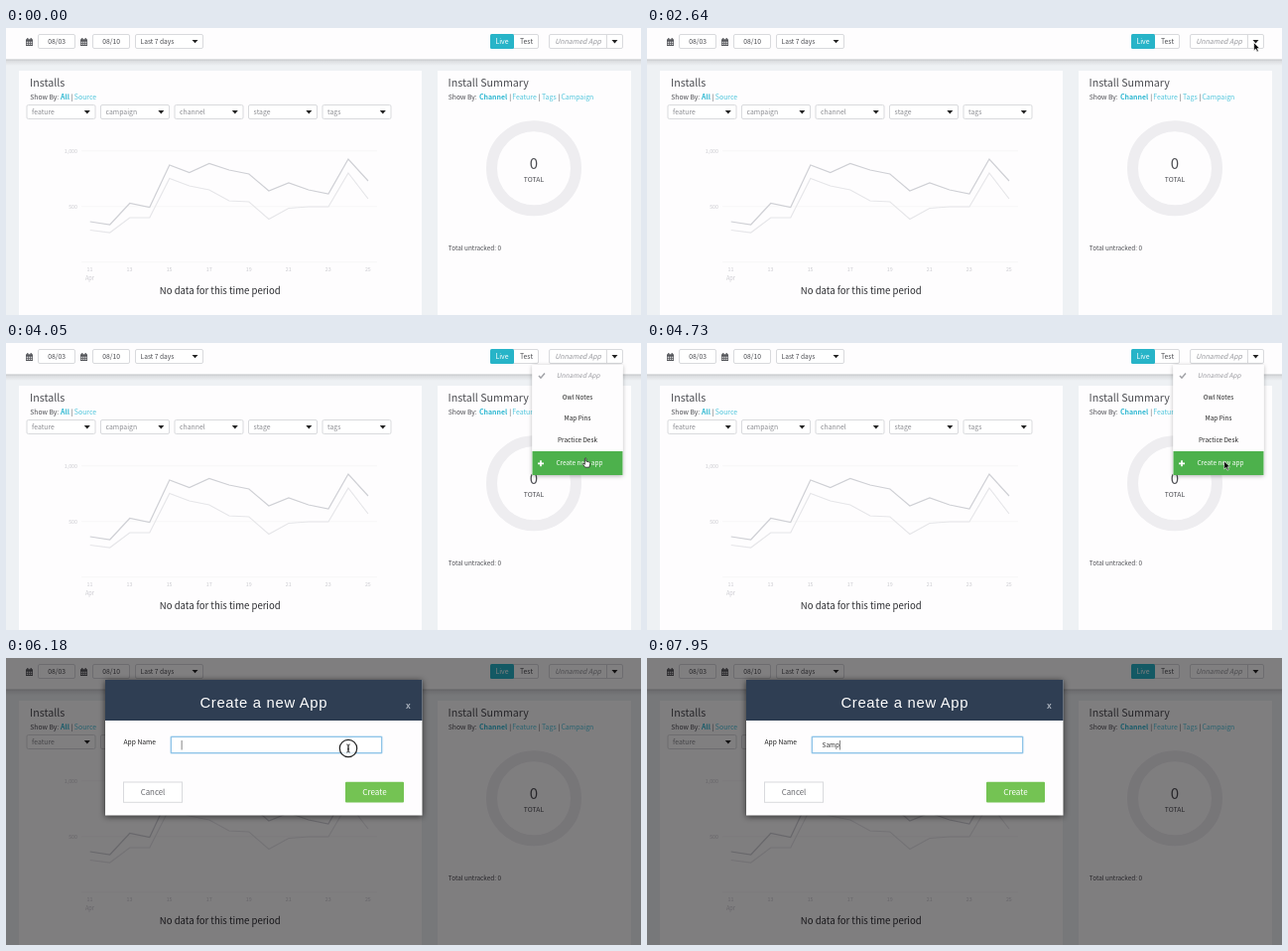
Recreate the animation shown at these times as an HTML page. Size 640x289 px, loop 8000 ms.

```html
<!DOCTYPE html>
<html lang="en">
<head>
<meta charset="utf-8">
<title>Create a new app</title>
<style>
  html, body { margin: 0; width: 100%; height: 100%; overflow: hidden; background: #eef1f4; }
  svg { display: block; width: 100vw; height: 100vh; font-family: "Noto Sans CJK SC", "Noto Sans CJK JP", "Noto Sans CJK", Lato, sans-serif; font-weight: 300; }
  text { white-space: pre; }
</style>
</head>
<body>
<svg id="stage" viewBox="0 0 640 289"></svg>
<script>
const LOOP = 8000;
const INK = '#4c4d52', GREY = '#8b8c91', LINK = '#4fc6dc', EDGE = '#d9dadd';

const text = (x, y, s, size, fill = INK, extra = '') =>
  `<text x="${x}" y="${y}" font-size="${size}" fill="${fill}" ${extra}>${s}</text>`;
const mid = (x, y, s, size, fill, extra = '') =>
  text(x, y, s, size, fill, `text-anchor="middle" ${extra}`);
const rect = (x, y, w, h, fill, extra = '') =>
  `<rect x="${x}" y="${y}" width="${w}" height="${h}" fill="${fill}" ${extra}/>`;
const field = (x, y, w, h, r = 1.5) => rect(x, y, w, h, '#fff', `rx="${r}" stroke="${EDGE}"`);
const arrowDown = (x, y) => `<path d="M${x - 3} ${y - 1.6}h6l-3 3.4z" fill="#222"/>`;
const calendar = x => `<g transform="translate(${x} 10)">
  <path d="M0 1.3h7v6.7h-7z" fill="#55565b"/><path d="M1.8 0v2M5.2 0v2" stroke="#55565b" stroke-width="1.2"/>
  <path d="M.7 4.3h5.6M.7 6.3h5.6" stroke="#fff" stroke-width="1.1" stroke-dasharray="1.4 .7"/></g>`;

function header() {
  return rect(0, 31, 640, 7, 'url(#drop)') + rect(0, 0, 640, 31.5, '#fefdfe') +
    calendar(20) + field(32.5, 6.5, 37, 14) + mid(51.2, 16, '08/03', 6.8) +
    calendar(75) + field(87.5, 6.5, 37, 14) + mid(106.2, 16, '08/10', 6.8) +
    field(130.5, 6.5, 68, 14) + text(135.6, 16, 'Last 7 days', 6.6) + arrowDown(190.5, 13.5) +
    field(488.5, 6.5, 48, 14) + rect(488, 6, 24, 15, '#27b4c8', 'rx="1.5"') +
    mid(500, 16.4, 'Live', 6.9, '#fff') + mid(524.5, 16.4, 'Test', 6.9, INK) +
    field(547.5, 6.5, 74, 14) + rect(605, 6.5, 1, 14, EDGE) +
    text(553.2, 16.4, 'Unnamed App', 7, '#97989d', 'font-style="italic"') + arrowDown(613.5, 13.6);
}

function chart() {
  const line = (ys, colour) => `<polyline fill="none" stroke="${colour}" stroke-width="1.2" points="${
    ys.map((y, i) => `${84.7 + i * 20.02},${y}`).join(' ')}"/>`;
  const pale = '#cbcbd0';
  let out = [123.5, 179.5, 235.5].map(y => rect(76, y, 298, .7, '#f5f4f6')).join('');
  out += text(72, 125.6, '1,000', 5.3, pale, 'text-anchor="end"') +
    text(72, 181.6, '500', 5.3, pale, 'text-anchor="end"');
  for (let i = 0; i < 8; i++) out += mid(84.5 + i * 40.05, 244.6, 11 + 2 * i, 5.3, pale);
  return out + mid(84.5, 253.6, 'Apr', 5.6, pale) +
    line([203.5, 206, 191, 191, 151.5, 159, 163, 174, 175, 192.5, 181.5, 180, 180, 146, 172], '#e6e6e9') +
    line([195, 198, 176.5, 180.5, 138, 145.5, 136.5, 143, 147, 164, 156, 163, 167, 132, 154], '#cfd0d5');
}

function cards() {
  const filters = ['feature', 'campaign', 'channel', 'stage', 'tags'].map((s, i) => {
    const x = 21 + i * 74.5;
    return field(x, 77.5, 69, 14) + text(x + 5.1, 87, s, 6.85, GREY) + arrowDown(x + 60.8, 84.6);
  }).join('');
  const bar = x => mid(x, 71.7, '|', 6.8);
  const link = (x, s, bold) => text(x, 71.7, s, 6.95, bold ? '#2fb8d2' : LINK, bold ? 'font-weight="700"' : '');
  return rect(13, 43, 406, 250, '#fefdfe') + rect(435, 43, 195, 250, '#fefdfe') +
    text(24, 59, 'Installs', 10.7) + text(24.3, 71.7, 'Show By:', 6.75) +
    link(55, 'All', true) + bar(66.7) + link(68.8, 'Source') + filters + chart() +
    mid(215.8, 268.3, 'No data for this time period', 9.55, '#2c2d31', 'font-weight="400"') +
    text(445.5, 59, 'Install Summary', 10.7) + text(445.8, 71.7, 'Show By:', 6.75) +
    link(477, 'Channel', true) + bar(508.2) + link(510.2, 'Feature') + bar(537.3) +
    link(540, 'Tags') + bar(557.3) + link(559.4, 'Campaign') +
    '<circle cx="532" cy="141.3" r="42.5" fill="none" stroke="#eeedf0" stroke-width="11"/>' +
    mid(532, 141.8, '0', 15, INK) + mid(532, 154.6, 'TOTAL', 6.8, INK) +
    text(445.8, 223.6, 'Total untracked: 0', 6.4);
}

function menu() {
  return `<g id="menu">${rect(530.5, 22, 91, 111, '#fff', 'filter="url(#soft)"')}
    ${rect(530.5, 22, 91, 111, '#fefdfe')}<rect id="hover" x="530.5" width="91" height="21.5" fill="#f5f5f7"/>
    <path d="M537 33l2 2.2 4-4.6" fill="none" stroke="#a0a1a6" stroke-width="1.5"/>
    ${text(554.8, 35, 'Unnamed App', 6.55, '#97989d', 'font-style="italic"')}
    ${mid(576, 57, 'Owl Notes', 6.4, '#222')}${mid(576, 78.2, 'Map Pins', 6.4, '#222')}
    ${mid(576, 99.5, 'Practice Desk', 6.4, '#222')}
    <rect id="add" x="530.5" y="109" width="91" height="24"/>
    <path d="M536 121.3h6M539 118.3v6" stroke="#fff" stroke-width="1.7"/>
    ${text(554.4, 123.4, 'Create new app', 6.5, '#fff')}</g>`;
}

function modal() {
  return `<g id="modal">${rect(0, 0, 640, 289, '#020003', 'opacity=".5"')}
    ${rect(100, 23, 319.5, 136.5, '#000', 'filter="url(#deep)" opacity=".65"')}
    ${rect(100, 22, 319.5, 136.5, '#fefdfe')}${rect(100, 22, 319.5, 41, '#2f3e53')}
    ${mid(259.8, 50, 'Create a new App', 14.8, '#fff', 'font-family="Liberation Sans, Arial, sans-serif" font-weight="400" letter-spacing=".7"')}
    ${mid(405.3, 51, 'x', 8.5, '#aab2bd', 'font-family="Liberation Sans, Arial, sans-serif" font-weight="700"')}
    ${text(118.4, 87, 'App Name', 6.75, '#222')}
    <rect id="glow" x="165.7" y="78.7" width="213.6" height="17.6" rx="2" fill="none" stroke="#c4e0f4" stroke-width="1.6" opacity=".7"/>
    <rect id="input" x="166.5" y="79.5" width="212" height="16" fill="#fff"/>
    ${text(176.6, 90.2, '', 6.4, '#333', 'id="typed"')}
    <rect id="caret" y="83" width=".8" height="9.5" fill="#666"/>
    ${field(118.5, 125, 59, 20.3, 0)}${mid(148, 138, 'Cancel', 7.85, '#66676c')}
    ${rect(342, 124.8, 59, 20.7, '#74c353', 'rx="1"')}${mid(371.5, 138, 'Create', 8.1, '#fff')}</g>`;
}

const pointers = `<g id="pointer">
  <path id="arrow" d="M0 0v8l1.9-1.7 1.3 2.9 1.4-.6-1.3-2.8h2.5z" fill="#000" stroke="#fff" stroke-width=".6"/>
  <path id="hand" d="M-.6-3.8q.8-.9 1.4 0v3l3.2.8q1 .3.8 1.6l-.9 3.6h-4.2l-2.5-3.4q.2-1.1 1.3-.3l.9.8z"
    fill="#fff" stroke="#222" stroke-width=".8"/>
  <g id="beam"><circle id="ring" r="8.7" fill="#fff" fill-opacity=".75" stroke="#222" stroke-width="1.2"/>
    <path d="M-1.8-4q1.8 0 1.8 1v6q0 1-1.8 1M1.8-4q-1.8 0-1.8 1v6q0 1 1.8 1M-1 .8h2" fill="none" stroke="#222" stroke-width=".8"/></g>
</g>`;

document.getElementById('stage').innerHTML = `<defs>
  <linearGradient id="drop" x2="0" y2="1"><stop stop-color="#b9bbbf"/><stop offset=".35" stop-color="#dcdee1"/>
    <stop offset="1" stop-color="#eef1f4"/></linearGradient>
  <filter id="soft" x="-20%" y="-20%" width="140%" height="140%"><feDropShadow dx="0" dy="1" stdDeviation="2" flood-opacity=".3"/></filter>
  <filter id="deep" x="-10%" y="-20%" width="120%" height="140%"><feGaussianBlur stdDeviation="3"/></filter>
  </defs>${rect(0, 0, 640, 289, '#eef1f4')}${header()}${cards()}${menu()}${modal()}${pointers}`;

const el = {};
document.querySelectorAll('#stage [id]').forEach(n => el[n.id] = n);
const show = (n, on) => n.setAttribute('display', on ? 'inline' : 'none');
const set = (n, attrs) => { for (const k in attrs) n.setAttribute(k, attrs[k]); };
const clamp = v => Math.max(0, Math.min(1, v));
const ease = v => v * v * (3 - 2 * v);

// Pointer stops: time, x, y
const path = [[90, 480, 247], [860, 589, 48], [1250, 611.7, 14.7], [2700, 611.7, 14.7], [3050, 594, 56],
  [3440, 584, 120], [4100, 584, 120], [4500, 581.7, 119], [5150, 581.7, 119], [5850, 345, 91], [8000, 345, 91]];
const OPEN = 2680, MODAL = 4750, FOCUS = 6030;
const keys = [7130, 7400, 7660, 7900];

function pointerAt(t) {
  const i = Math.max(1, path.findIndex(p => p[0] >= t));
  const [a, b] = [path[i - 1], path[i]];
  const k = ease(clamp((t - a[0]) / (b[0] - a[0])));
  return [a[1] + (b[1] - a[1]) * k, a[2] + (b[2] - a[2]) * k];
}

function draw(t) {
  const [x, y] = pointerAt(t);
  const inModal = t >= MODAL, inMenu = t >= OPEN && !inModal;
  show(el.menu, inMenu);
  show(el.modal, inModal);

  // Menu hover: the last row fades out while the button darkens
  const h = clamp((t - 3470) / 200);
  const row = Math.max(0, Math.min(3, Math.floor((y - 22) / 21.5)));
  set(el.hover, { y: 22 + row * 21.5, opacity: t > 2750 ? 1 - h : 0 });
  set(el.add, { fill: `rgb(${106 - 29 * h},${190 - 13 * h},${74 + 2 * h})` });

  const n = keys.filter(k => t >= k).length;
  const focused = t >= FOCUS;
  el.typed.textContent = 'Samp'.slice(0, n);
  show(el.glow, focused);
  set(el.input, { stroke: focused ? '#8fc4e8' : '#cfd0d4' });
  show(el.caret, focused && (n || (t - FOCUS) % 1060 < 530));
  if (inModal) set(el.caret, { x: 176.7 + (n ? el.typed.getComputedTextLength() : 0) });

  const overInput = t > 5500 && x < 378 && y > 79 && y < 96;
  const overItem = inMenu && y > 22 && t < 4650;
  show(el.pointer, t >= 90 && !n);
  show(el.beam, overInput);
  show(el.hand, overItem);
  show(el.arrow, !overInput && !overItem);
  show(el.ring, t > FOCUS - 40 && t < 6290);
  set(el.pointer, { transform: `translate(${x} ${y})` });
}

const start = performance.now();
function tick(now) {
  draw(Math.max(0, now - start) % LOOP);
  requestAnimationFrame(tick);
}
draw(0);
requestAnimationFrame(tick);
</script>
</body>
</html>
```
